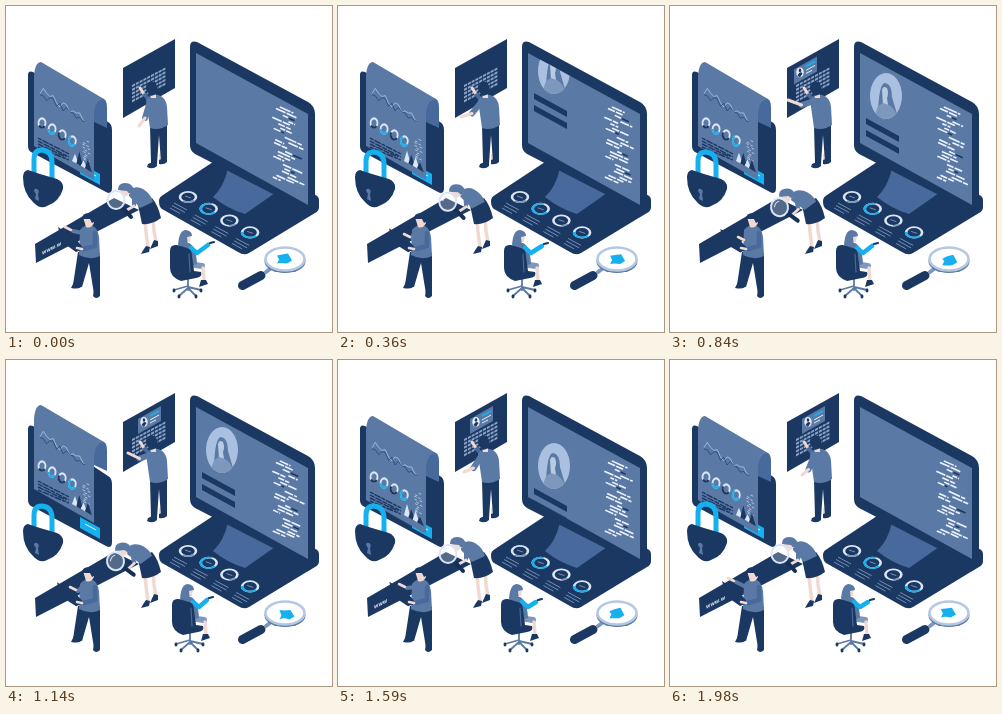
An HTML page that plays this animation: 326 px wide and 326 px high, repeating every 2.01 s.

```html
<!DOCTYPE html>
<html lang="en">
<head>
<meta charset="utf-8">
<title>Data team</title>
<style>
html, body { margin: 0; width: 100%; height: 100%; overflow: hidden; background: #fff; }
svg { display: block; width: 100vw; height: 100vh; }
.navy { fill: #1b3862; }
.deep { fill: #172f57; }
.mid { fill: #5a79a5; }
.soft { fill: #48699b; }
.sky { fill: #17b0ef; }
.pale { fill: #b9cbe4; }
.skin { fill: #f1d9d2; }
.line { fill: none; stroke: #e8eef8; stroke-width: 1; }
.limb { fill: none; stroke-linecap: round; stroke-linejoin: round; }
text { font: bold 6px Inter, Arial, sans-serif; fill: #dfe8f5; }
</style>
</head>
<body>
<svg viewBox="0 0 326 326">
  <defs>
    <clipPath id="screenClip"><path d="M190 47L302 108V199L190 137Z"/></clipPath>
    <clipPath id="wallClip"><path d="M117 62L169 33V82L117 112Z"/></clipPath>
    <clipPath id="faceClip"><ellipse cx="216" cy="90" rx="16" ry="23"/></clipPath>
  </defs>

  <!-- report -->
  <path class="navy" d="M22 69Q22 64 27 66L102 116Q106 118 106 124V182Q106 189 100 186L25 146Q22 144 22 140Z"/>
  <path class="sky" d="M74 157L94 168V179L74 168Z"/>
  <path d="M79 164L90 170" class="line"/>
  <g id="paper">
    <path class="soft" d="M80 90L98 93Q101 95 101 101V122L88 116Z"/>
    <path class="mid" d="M28 70Q29 56 35 56L98 93Q88 94 88 110V174L28 140Z"/>
    <path id="chartA" fill="none" stroke="#c3d2e8" stroke-width=".7"/>
    <path id="chartB" fill="none" stroke="#274877" stroke-width=".8"/>
    <g id="rings"></g>
    <g id="notes" stroke="#1b3862" stroke-width="1.4"></g>
    <g id="peaks"></g>
  </g>

  <!-- padlock -->
  <path id="shackle" class="limb" stroke="#17b0ef" stroke-width="5" stroke-linecap="butt" d="M28 173V160Q28 151 36 151Q46 152 46 163V180"/>
  <path class="navy" d="M17 171Q17 165 22 164L34 168L51 173Q58 176 57 183Q53 196 41 200Q34 204 27 196Q17 187 17 171Z"/>
  <path class="mid" d="M28 185Q28 182 31 183Q34 185 32 188L33 195L29 193L30 188Z"/>

  <!-- wall panel -->
  <path class="navy" d="M117 62L169 33V82L117 112Z"/>
  <g id="keys" fill="#8aa3c6"></g>
  <g clip-path="url(#wallClip)"><g id="profile">
    <path class="mid" d="M132 59L155 46V61L132 74Z"/>
    <ellipse cx="138" cy="62" rx="3.7" ry="5" fill="#e8eef8"/>
    <ellipse class="navy" cx="138" cy="60" rx="1.3" ry="1.8"/>
    <path class="navy" d="M135.5 65Q138 60 140.5 63L138 67Z"/>
    <path stroke="#17b0ef" stroke-width="2" d="M144 56L153 51"/>
    <path class="line" d="M144 60L153 55M144 63L150 60"/>
  </g></g>
  <g id="wallMan">
    <path class="skin" d="M145 152h4v7h-4zM153 148h4v7h-4z"/>
    <path class="navy" d="M144 120L161 117L161 153L155 156L153 129L151 158L145 157Z"/>
    <path class="navy" d="M142 158L151 154V160Q147 164 141 161ZM153 154L161 151V156Q158 159 153 158Z"/>
    <path class="limb" stroke="#f1d9d2" stroke-width="3" d="M138 88L134 82"/>
    <path class="limb" stroke="#48699b" stroke-width="4" d="M144 95L139 89"/>
    <path class="mid" d="M140 94Q144 88 152 89Q160 91 161 101L162 119Q153 125 144 122Z"/>
    <path id="wallSleeve" class="limb" stroke="#5a79a5" stroke-width="6"/>
    <path id="wallHand" class="limb" stroke="#f1d9d2" stroke-width="3"/>
    <path class="skin" d="M143 83h7v9h-5z"/>
    <path class="navy" d="M140 81Q142 75 148 76Q153 79 151 88L145 90Q140 86 140 81Z"/>
  </g>

  <!-- laptop -->
  <path class="navy" d="M153 195Q153 191 157 189L207 156L306 188Q313 189 313 194V201Q313 205 309 207L243 247Q238 250 232 246L156 203Q153 201 153 195Z"/>
  <path class="soft" d="M222 162L269 187L239 208Q222 203 207 191Q218 181 222 162Z"/>
  <g id="dials"></g>
  <path class="navy" d="M184 41Q184 34 191 36L302 96Q309 100 309 108V202Q309 208 302 206L189 148Q184 145 184 139Z"/>
  <path class="mid" d="M190 47L302 108V199L190 137Z"/>
  <g clip-path="url(#screenClip)">
    <g id="code" stroke-width="1.6"></g>
    <g id="card">
      <ellipse cx="216" cy="90" rx="16" ry="23" fill="#a9c0e0"/>
      <g clip-path="url(#faceClip)">
        <path class="mid" d="M208 107Q209 77 215 77Q222 78 222 91L227 108L209 112Z"/>
        <path class="pale" d="M212 84Q213 79 217 82Q219 87 217 92L218 99H213Z"/>
        <path fill="#7e98bd" d="M205 112Q206 99 213 97L219 99Q227 104 228 116Z"/>
      </g>
      <path class="navy" d="M196 112L229 130V136L196 118ZM196 124L229 142V148L196 130Z"/>
    </g>
  </g>

  <!-- search bar -->
  <path class="navy" d="M29 238L108 192L133 204L30 257Z"/>
  <text id="query" transform="matrix(.87 -.45 0 1 36 249)"></text>

  <!-- woman with lens -->
  <path class="limb" stroke="#f1d9d2" stroke-width="3.5" d="M139 213L140 226L142 242M147 210L148 225L150 236"/>
  <path class="navy" d="M140 240L144 241L143 246L135 248Q137 244 140 240ZM148 234L152 235V240L144 243Z"/>
  <path class="navy" d="M132 199L146 192Q152 199 155 212Q146 219 136 218Z"/>
  <g id="leaner">
    <path class="mid" d="M123 184Q130 179 137 183Q145 188 147 196L134 202Q129 196 123 190Z"/>
    <path class="limb" stroke="#5a79a5" stroke-width="4" d="M128 188L128 199"/>
    <path class="limb" stroke="#f1d9d2" stroke-width="2.8" d="M128 200L121 204"/>
    <path class="skin" d="M114 183Q115 179 121 180L125 187L119 191Q114 190 114 183Z"/>
    <path class="mid" d="M112 184Q112 177 119 177Q127 177 128 185Q124 190 121 185Z"/>
    <path class="limb" stroke="#172f57" stroke-width="4" d="M118 203L125 211"/>
    <ellipse cx="110" cy="194" rx="8.5" ry="9" fill="#fff" fill-opacity=".25" stroke="#dbe6f5" stroke-width="2"/>
    <path d="M105 193Q107 188 111 188" class="line"/>
  </g>

  <!-- man with tablet -->
  <path class="navy" d="M72 246L94 247L94 286L88 288L83 257L76 281L67 279Z"/>
  <path class="navy" d="M68 276L76 279Q75 284 65 282ZM88 284H94V290Q90 294 87 290Z"/>
  <g id="porter">
    <path class="mid" d="M74 224Q80 217 87 220Q92 223 93 231L94 250Q84 255 73 249Z"/>
    <path id="farSleeve" class="limb" stroke="#5a79a5" stroke-width="4"/>
    <path id="farHand" class="limb" stroke="#f1d9d2" stroke-width="2.6"/>
    <path id="tablet" class="navy" d="M52 221L70 233L78 243L70 246L56 236Z"/>
    <path class="limb" stroke="#48699b" stroke-width="4.5" d="M89 227L89 240L78 243"/>
    <path class="limb" stroke="#f1d9d2" stroke-width="2.6" d="M76 243L71 242"/>
    <path class="skin" d="M77 211H88V217Q85 223 80 221Z"/>
    <path class="navy" d="M76 213Q76 207 83 207Q91 208 90 215L86 217L84 213Z"/>
  </g>

  <!-- seated woman -->
  <g id="chair">
    <path class="limb" stroke="#5a79a5" stroke-width="1.8" d="M181 270V284M181 280L167 284M181 281L194 284M181 282L172 290M181 282L189 290"/>
    <path class="limb" stroke="#1b3862" stroke-width="2.8" d="M167 284v1M194 284v1M172 290v1M189 290v1"/>
    <path class="limb" stroke="#7e98bd" stroke-width="6" d="M181 258L195 260"/>
    <path class="limb" stroke="#f1d9d2" stroke-width="3.4" d="M196 262L197 275"/>
    <path class="navy" d="M194 274H199L201 278L192 281Z"/>
    <path class="mid" d="M172 241Q175 236 182 237Q189 240 190 258L176 262Z"/>
    <path class="skin" d="M177 226L184 228L183 236H178Z"/>
    <path class="mid" d="M171 239Q172 224 179 224Q185 225 185 230L180 231L181 241Q176 245 171 239Z"/>
    <path id="typing" class="limb" stroke="#17b0ef" stroke-width="4.5"/>
    <path id="stylus" class="limb" stroke="#1b3862" stroke-width="2.2"/>
    <path class="navy" d="M163 245Q163 238 170 239L180 242Q185 243 185 250L187 265L194 266Q196 271 189 272L174 275Q163 271 163 262Z"/>
    <path class="limb" stroke="#48699b" stroke-width="1.2" d="M182 248L183 266"/>
  </g>

  <!-- magnifier -->
  <path class="limb" stroke="#1b3862" stroke-width="9" d="M236.500 279.500L255 269.500"/>
  <path class="limb" stroke="#7e98bd" stroke-width="4" d="M260 266L264 263"/>
  <ellipse cx="279" cy="255.500" rx="20.500" ry="11.500" fill="#5a79a5"/>
  <ellipse cx="279" cy="253" rx="19.500" ry="11.500" fill="#fff" stroke="#b5c8e3" stroke-width="2.6"/>
  <path id="blob" class="sky"/>
</svg>

<script>
const LOOP = 2010, STEP = 30;
const el = id => document.getElementById(id);
const set = (id, name, value) => el(id).setAttribute(name, value);
const shift = (id, x, y) => set(id, 'transform', `translate(${x} ${y})`);
const smooth = p => p * p * (3 - 2 * p);

// Each stop is [time, ...values].
function at(t, stops) {
  let i = 0;
  while (i < stops.length - 2 && t >= stops[i + 1][0]) i++;
  const [a, b] = [stops[i], stops[i + 1]];
  const p = smooth(Math.min(1, Math.max(0, (t - a[0]) / (b[0] - a[0]))));
  return a.slice(1).map((v, k) => v + (b[k + 1] - v) * p);
}

function seeded(n) {
  const v = Math.sin(n * 91.7 + 4) * 43758.5;
  return v - Math.floor(v);
}

const repeat = (n, make) => Array.from({ length: n }, (_, i) => make(i)).join('');

function ring(x, y, rx, ry, width, turn, color) {
  return `<g transform="translate(${x} ${y}) scale(1 ${ry / rx})" fill="none" stroke-width="${width}">
    <circle r="${rx}" stroke="#dbe6f5"/>
    <circle r="${rx}" stroke="${color}" pathLength="100" stroke-dasharray="${turn} 100" transform="rotate(40)"/></g>`;
}

el('notes').innerHTML = repeat(6, i =>
  `<path stroke-dasharray="${4 + i % 3} 1 7 1" d="M32 ${132 + i * 3}l${i < 2 ? 31 : 23 + seeded(i) * 8} ${i < 2 ? 16 : 13}"/>`);

el('keys').innerHTML = repeat(5, r => repeat(9, c => {
  const x = 126 + c * 3.8, y = 79 + r * 3.8 - c * 2;
  return `<path d="M${x} ${y}l3-1.600v2.200l-3 1.600z"/>`;
}));

el('rings').innerHTML = repeat(4, i =>
  ring(36 + i * 10.1, 117 + i * 6, 3.5, 4.6, 1.8, 30 + i * 9, i % 2 ? '#17b0ef' : '#1b3862'));

el('dials').innerHTML = repeat(4, i => {
  const x = 182 + i * 20.7, y = 191 + i * 11.8;
  return ring(x, y, 8, 5.2, 2.6, [25, 70, 15, 40][i], i % 2 ? '#17b0ef' : '#7e98bd') +
    `<path stroke="#7e98bd" stroke-width=".9" d="M${x - 3} ${y - 1}l6 2M${x - 14} ${y + 6}l13 7M${x - 16} ${y + 8.5}l13 7M${x - 18} ${y + 11}l10 5.500"/>`;
});

function drawReport(t) {
  const [rise] = at(t, [[0, 0], [900, 0], [1110, -11], [1230, -11], [1470, 0], [LOOP, 0]]);
  shift('paper', 0, rise);
  const [amp] = at(t, [[0, 1], [360, 1], [600, .15], [840, 1], [LOOP, 1]]);
  const chart = (base, seed) => 'M' + Array.from({ length: 15 }, (_, i) =>
    `${34 + i * 3.3} ${base + i * 2.2 + (seeded(i + seed) - .5) * 8 * amp}`).join('L');
  set('chartA', 'd', chart(84, 3));
  set('chartB', 'd', chart(87, 17));
  const wave = Math.sin(t / LOOP * 4 * Math.PI + 1.6);
  const bumps = repeat(4, i => {
    const x = 66 + i * 4.3, y = 155 + i * 2.4;
    const h = 7 + seeded(i + 8) * 3 + wave * (i % 2 ? 2 : -2);
    return `<path fill="${i % 2 ? '#1b3862' : '#dbe6f5'}" d="M${x} ${y}L${x + 3} ${y - h}L${x + 7} ${y + 4}Z"/>`;
  });
  const specks = repeat(14, i => {
    const x = 76 + seeded(i + 60) * 6, y = 134 + i * 1.5 + wave;
    return `<path stroke="#b9cbe4" stroke-width=".9" d="M${x} ${y}l2.500 1.200"/>`;
  });
  el('peaks').innerHTML = specks + bumps;
  const [lift] = at(t, [[0, -7], [240, -5], [1800, -5], [LOOP, -7]]);
  shift('shackle', 0, lift);
}

function drawWall(t) {
  const [x] = at(t, [[0, -48], [450, -40], [600, -28], [840, -8], [1080, 0], [LOOP, 0]]);
  shift('profile', x, -x * .55);
  el('profile').style.visibility = t < 480 ? 'hidden' : 'visible';
  const [hx, hy] = at(t, [[0, 133, 120], [360, 123, 111], [600, 118, 107], [840, 118, 94],
    [1140, 122, 93], [1590, 126, 112], [1980, 132, 115], [LOOP, 133, 120]]);
  const ex = (hx + 143) / 2 + 1, ey = (hy + 98) / 2 + 3;
  set('wallSleeve', 'd', `M144 95L${ex} ${ey}`);
  set('wallHand', 'd', `M${ex} ${ey}L${hx} ${hy}`);
}

function drawScreen(t) {
  const [y] = at(t, [[0, -95], [180, -75], [360, -25], [600, -2], [840, 0], [1380, 0], [1590, 16], [1860, 120], [LOOP, 120]]);
  shift('card', 0, y);
  el('code').innerHTML = repeat(22, i => {
    const x = 266 + seeded(i) * 17, y = 97 + i * 3.5 + (x - 266) * .5;
    const w = Math.min(300 - x, 9 + seeded(i + 40) * 9 + 3 * Math.sin(t / LOOP * 6 * Math.PI + i * 1.7));
    const cut = w * (.4 + seeded(i + 9) * .4), rest = Math.max(0, w - cut - 1);
    const tail = i % 5 === 2 ? '#1b3862' : '#edf3fc';
    return `<path stroke="#edf3fc" d="M${x} ${y}l${cut} ${cut * .45}"/>
      <path stroke="${tail}" d="M${x + cut + 1} ${y + cut * .45 + .5}l${rest} ${rest * .45}"/>`;
  });
}

function drawPeople(t) {
  const query = 'www.w';
  const n = t < 180 ? 5 : t < 1380 ? 0 : Math.ceil((t - 1380) / 100);
  el('query').textContent = query.slice(0, n);

  const [lean] = at(t, [[0, 0], [360, -3], [600, -12], [1200, -12], [1560, 0], [LOOP, 0]]);
  set('leaner', 'transform', `rotate(${lean} 144 200)`);

  const [ax, ay, tilt] = at(t, [[0, 59, 221, 0], [360, 66, 228, 3], [840, 68, 231, 5],
    [1140, 64, 227, 3], [1590, 61, 224, 2], [1980, 58, 218, 0], [LOOP, 59, 221, 0]]);
  set('farSleeve', 'd', `M76 227L${ax + 8} ${ay + 4}`);
  set('farHand', 'd', `M${ax + 6} ${ay + 3}L${ax} ${ay}`);
  set('tablet', 'transform', `rotate(${-tilt} 75 243)`);

  const [turn, hx, hy] = at(t, [[0, 1, 203, 238], [360, 3, 203, 239], [1140, 3, 200, 239],
    [1590, 0, 200, 241], [1980, 0, 200, 241], [LOOP, 1, 203, 238]]);
  shift('chair', turn, 0);
  set('typing', 'd', `M184 242L190 247L${hx - 2} ${hy + 1}`);
  set('stylus', 'd', `M${hx} ${hy - 1}l4 -1`);
}

function drawBlob(t) {
  const a = t / LOOP * 2 * Math.PI;
  const x = 279 - Math.cos(a) + Math.sin(a * 2) * .7, y = 253.5 - Math.cos(a);
  const k = Math.sin(a * 3) * 1.5;
  set('blob', 'd', `M${x - 7} ${y - 3 + k}L${x - 2} ${y - 4}L${x + 4} ${y - 5 - k * .4}L${x + 8} ${y + 2}L${x + 3} ${y + 5}Q${x - 3} ${y + 4 + k} ${x - 7} ${y + 5}L${x - 5} ${y + 1}Z`);
}

const start = performance.now();
function frame() {
  const t = Math.floor(((performance.now() - start) % LOOP) / STEP) * STEP;
  drawReport(t);
  drawWall(t);
  drawScreen(t);
  drawPeople(t);
  drawBlob(t);
  requestAnimationFrame(frame);
}
frame();
</script>
</body>
</html>
```
